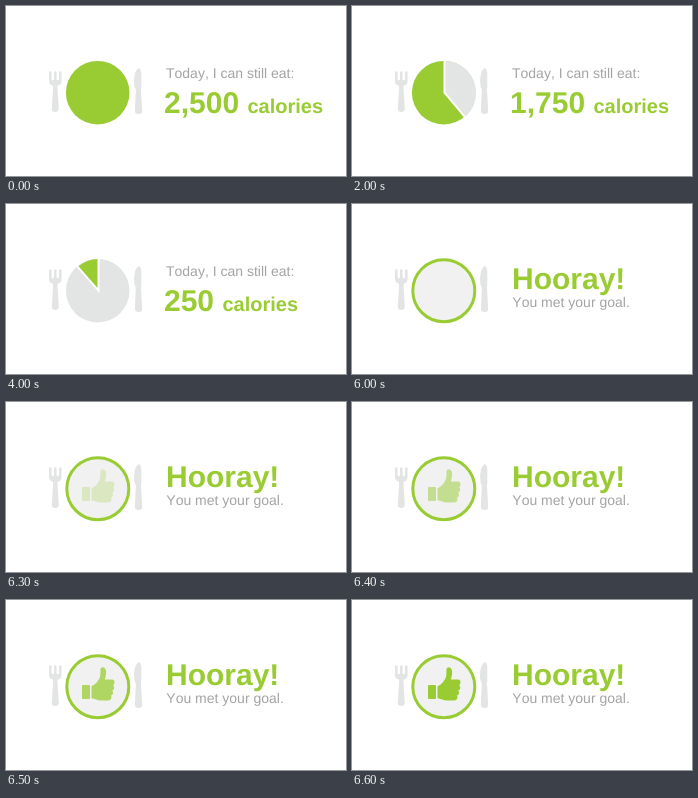
Recreate the animation shown at these times as an HTML page. Size 340 by 170 pixels, loop 8600 ms.

```html
<!DOCTYPE html>
<html lang="en">
<head>
<meta charset="utf-8">
<title>Calorie plate</title>
<style>
  html, body { margin: 0; width: 100%; height: 100%; overflow: hidden; background: #fff; }
  svg { display: block; width: 340px; height: 170px; }
  text { font-family: "Liberation Sans", Arial, sans-serif; text-rendering: geometricPrecision; }
  .note { font-size: 14px; font-kerning: none; fill: #a4a4a4; }
  .big { font-size: 30px; font-weight: bold; }
  .unit { font-size: 20px; }
  .green { fill: #9c3; }
  .grey { fill: #e3e4e4; }
</style>
</head>
<body>
<svg viewBox="0 0 340 170">
  <g class="grey">
    <path id="fork" d="M43 66q1.300-1.600 2.600 0v7.500q1.200 1.600 2.400 0V66q1.300-1.600 2.600 0v7.500q1.200 1.600 2.400 0V66
      q1.300-1.600 2.600 0v9q0 3.600-3.600 4.600q-.8 1-.5 3l1.300 20q.2 3.400-3.500 3.400t-3.500-3.400l1.300-20q.3-2-.5-3q-3.600-1-3.600-4.600z"/>
    <path id="knife" d="M133 62q2.300 1.400 2.300 5v14.500q-.6 1.400-.3 3l1.200 20q.2 3.600-3.600 3.600t-3.700-3.600l.9-20
      q.2-2-1.200-3.500q-1.400-7 .4-13.500q1.500-4.500 4-5.500z"/>
  </g>

  <g id="pie">
    <circle id="plate" cx="91.700" cy="86.700" r="31.800"/>
    <path id="slice"/>
    <path id="gaps" fill="none" stroke="#fff" stroke-width="2"/>
  </g>

  <g id="done">
    <circle cx="91.800" cy="86.700" r="31" fill="#f1f1f1" stroke="#9c3" stroke-width="3"/>
    <g id="thumb" class="green">
      <rect x="76" y="85" width="8" height="14" rx="1"/>
      <path d="M85.500 86.500C89.500 84.500 94 79.500 94.300 75L94.500 69Q95 67 97 67.200
        C101 68 100.800 74 98.800 79.500H106Q108.800 79.800 108.500 82.500T106.800 85.300
        Q108.600 86 108.200 88.200T106 90.600Q107.600 91.500 107 93.500T104.700 95.700
        Q106 96.500 105.300 98.500T102 100.500H95C91 100.500 89 98.500 85.500 98.300Z"/>
    </g>
    <text x="160" y="85" class="big green">Hooray!</text>
    <text x="160.300" y="103" class="note">You met your goal.</text>
  </g>

  <g id="counter">
    <text x="160" y="72" class="note">Today, I can still eat:</text>
    <text x="158" y="106.500" class="big green"><tspan id="amount"></tspan> <tspan class="unit">calories</tspan></text>
  </g>
</svg>
<script>
const LOOP = 8600;
const CENTER = [92.5, 86.7], RADIUS = 31.6;
const stages = [
  { amount: '2,500', plate: 'green' },
  { amount: '1,750', plate: 'green', slice: 'grey', from: 0, to: 140 },
  { amount: '250', plate: 'grey', slice: 'green', from: -41, to: 0 }
];
const el = id => document.getElementById(id);

// Angles run clockwise from twelve o'clock.
function rim(degrees, radius) {
  const a = degrees * Math.PI / 180;
  return [CENTER[0] + radius * Math.sin(a), CENTER[1] - radius * Math.cos(a)];
}

function drawPie({ amount, plate, slice, from, to }) {
  el('amount').textContent = amount;
  el('plate').setAttribute('class', plate);
  el('slice').setAttribute('class', slice || plate);
  el('slice').setAttribute('d', slice
    ? `M${CENTER}L${rim(from, RADIUS)}A${RADIUS} ${RADIUS} 0 0 1 ${rim(to, RADIUS)}Z` : '');
  el('gaps').setAttribute('d', slice
    ? `M${rim(from, RADIUS + 2)}L${CENTER}L${rim(to, RADIUS + 2)}` : '');
}

function render(now) {
  const t = now % LOOP;
  const finished = t >= 6000;
  el('done').style.display = finished ? '' : 'none';
  el('pie').style.display = el('counter').style.display = finished ? 'none' : '';
  if (finished) {
    const step = Math.floor((t - 6200) / 100);
    el('thumb').style.opacity = Math.max(0, Math.min(4, step)) / 4;
  } else {
    drawPie(stages[Math.floor(t / 2000)]);
  }
}

const start = performance.now();
function tick() {
  render(performance.now() - start);
  requestAnimationFrame(tick);
}
tick();
</script>
</body>
</html>
```
